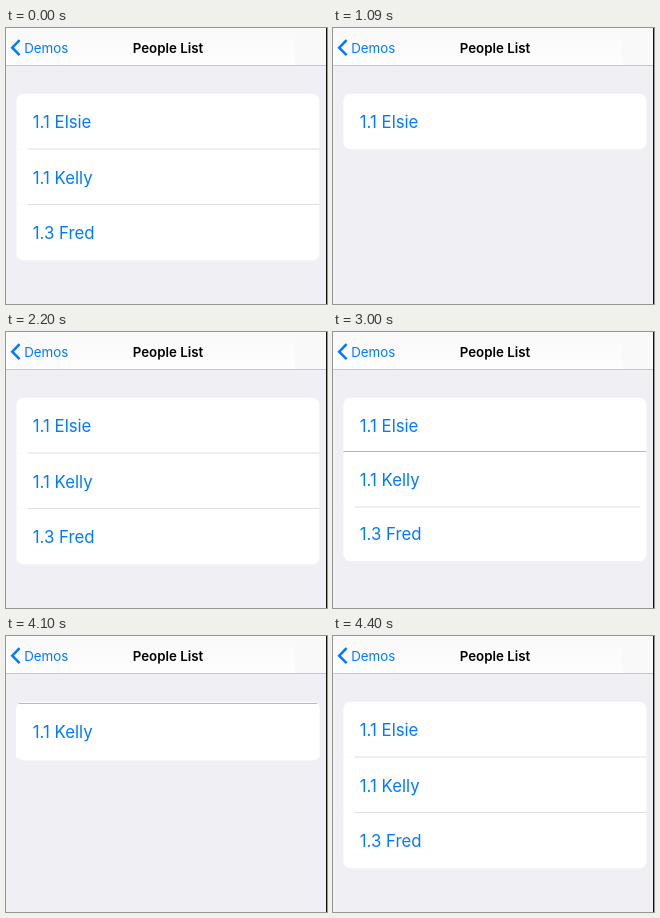
Animation, 321 px wide and 276 px high, one loop 4.5 s. Source, as an HTML page:

```html
<!DOCTYPE html>
<html lang="en">
<head>
<meta charset="utf-8">
<title>People List</title>
<style>
  html, body { margin: 0; width: 100%; height: 100%; overflow: hidden; background: #efeff4; }
  svg { display: block; width: 100vw; height: 100vh; }
  text { font-family: Inter, Roboto, sans-serif; fill: #007aff; }
  .row { font-size: 16.8px; }
  .card { fill: #fff; }
  .sep { fill: #dfdfe2; }
</style>
</head>
<body>
<svg viewBox="0 0 321 276">
  <defs>
    <linearGradient id="bar" x1="0" x2="0" y1="0" y2="1">
      <stop offset="0" stop-color="#f9f9fa"/>
      <stop offset="1" stop-color="#fefefe"/>
    </linearGradient>
    <clipPath id="topRow"><path id="clipShape"/></clipPath>
  </defs>
  <rect width="321" height="276" fill="#efeff4"/>

  <rect width="321" height="37.5" fill="url(#bar)"/>
  <rect x="289" width="32" height="37" fill="#f9f9fa"/>
  <rect y="37" width="321" height="1" fill="#c6c6c9"/>
  <path d="M13.6 12.2 6.2 19.7l7.4 7.5" fill="none" stroke="#007aff" stroke-width="2.5"/>
  <text x="18.2" y="24.5" font-size="13.3">Demos</text>
  <text x="162" y="24.5" font-size="13.3" text-anchor="middle" font-weight="600" style="fill:#000">People List</text>

  <g id="first">
    <path id="firstCard" class="card"/>
    <text class="row" x="26.8" y="100">1.1 Elsie</text>
  </g>
  <g id="third">
    <path id="thirdCard" class="card"/>
    <text class="row" x="26.8" y="100">1.3 Fred</text>
  </g>
  <g id="second">
    <path id="secondCard" class="card"/>
    <text class="row" x="26.8" y="100">1.1 Kelly</text>
  </g>
  <g clip-path="url(#topRow)">
    <rect id="edge" x="10" width="304" height="1" fill="#b9b9bc"/>
  </g>
  <rect id="sepA" class="sep" x="22" width="291.5" height="1"/>
  <rect id="sepB" class="sep" x="22" width="291.5" height="1"/>
  <rect x="320" width="1" height="276" fill="#111"/>
</svg>
<script>
const LOOP = 4500, STARTS = [800, 1900, 3000, 4100];
const LEFT = 10.4, RIGHT = 313.4, TOP = 65.8, ROW = 55.5, R = 7;
const el = id => document.getElementById(id);
const show = (id, on) => el(id).setAttribute('visibility', on ? 'visible' : 'hidden');
const moveTo = (id, y) => el(id).setAttribute('transform', `translate(0 ${y})`);
const setY = (id, y) => el(id).setAttribute('y', y);
const smooth = u => u * u * (3 - 2 * u);

// One row with separate top and bottom corner radii.
function rowPath(a, b) {
  const w = RIGHT - LEFT;
  return `M${LEFT} ${TOP + a}a${a} ${a} 0 0 1 ${a} ${-a}h${w - 2 * a}` +
    `a${a} ${a} 0 0 1 ${a} ${a}v${ROW - a - b}a${b} ${b} 0 0 1 ${-b} ${b}` +
    `h${2 * b - w}a${b} ${b} 0 0 1 ${-b} ${-b}z`;
}
const shape = (id, a, b) => el(id).setAttribute('d', rowPath(a, b));

function stateAt(t) {
  const k = STARTS.filter(s => t >= s).length - 1;
  if (k < 0) return { open: 1, closing: false };
  const lead = k ? 0 : 10;
  const step = Math.floor((t - STARTS[k] + lead) / 100);
  const p = smooth(Math.min(1, 0.1 + 0.36 * step));
  const closing = k % 2 === 0;
  return { open: closing ? 1 - p : p, closing };
}

function draw(t) {
  const { open, closing } = stateAt(t);
  const full = open === 1, shut = open === 0, moving = !full && !shut;
  const y = ROW * open;

  shape('firstCard', R, shut ? R : 0);
  shape('secondCard', moving ? 4 : 0, moving ? 3 : 0);
  shape('thirdCard', moving ? 3 : 0, R);
  moveTo('second', y);
  moveTo('third', 2 * y);
  show('second', !shut);
  show('third', !shut);

  show('edge', moving);
  setY('edge', Math.round(TOP + y - 0.5));
  show('sepA', full);
  setY('sepA', TOP + y - 0.8);
  show('sepB', full || (moving && closing));
  setY('sepB', TOP + ROW + y - 0.8);
  el('sepB').setAttribute('width', full ? 291.5 : 285);
}

shape('clipShape', R, 0);
const begin = performance.now();
function tick() {
  draw((performance.now() - begin) % LOOP);
  requestAnimationFrame(tick);
}
tick();
</script>
</body>
</html>
```
